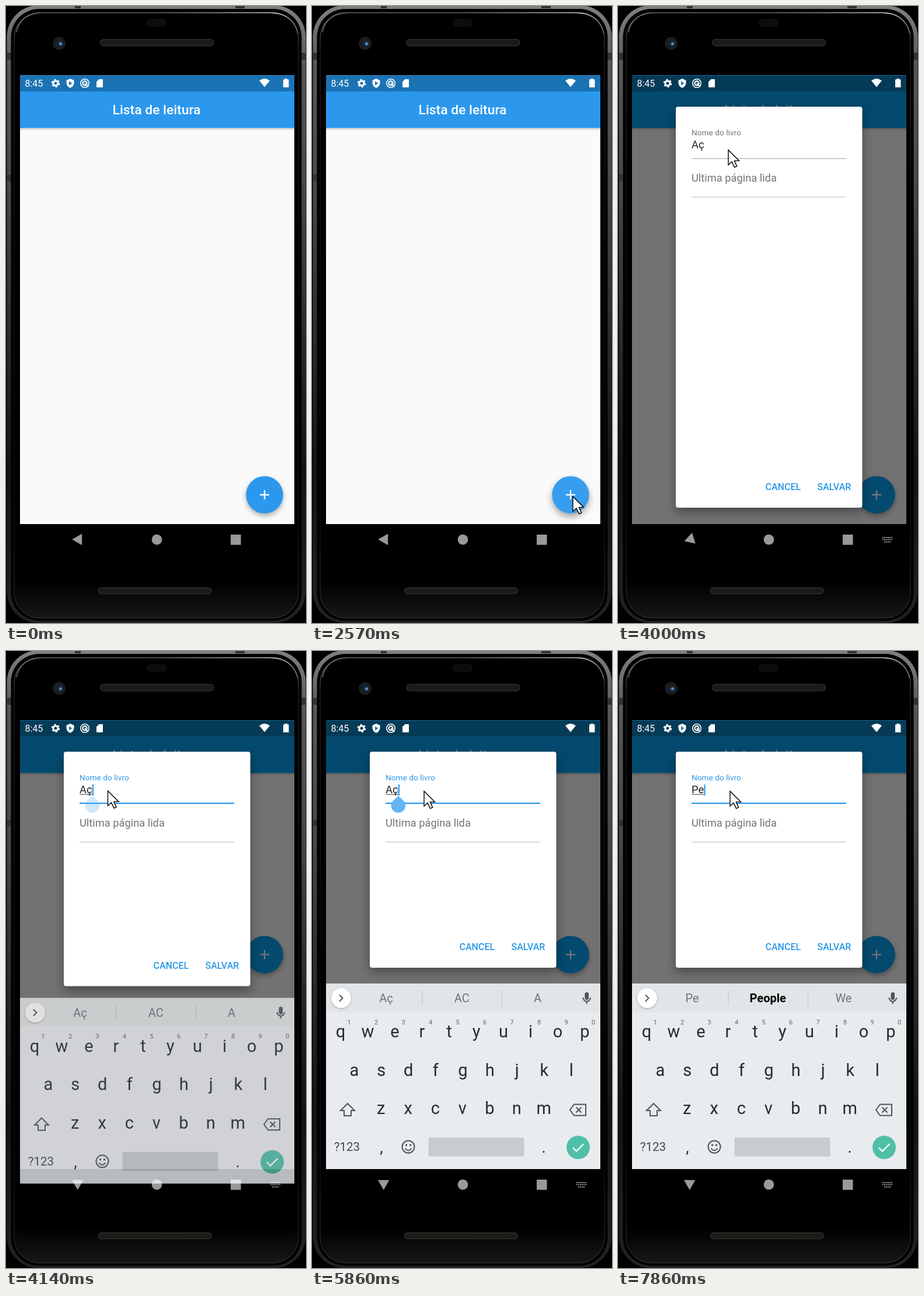
An HTML page for the animation above (8 s loop, 514x1054 px).

```html
<!DOCTYPE html>
<html lang="pt">
<head>
<meta charset="utf-8">
<title>Lista de leitura</title>
<style>
html, body { margin: 0; width: 100%; height: 100%; overflow: hidden; background: #000; }
svg { display: block; width: 100%; height: 100%; font-family: Roboto, sans-serif; }
.mid { text-anchor: middle; }
.med { font-weight: 500; }
.line { fill: none; stroke-linecap: butt; }
#dialog rect { filter: drop-shadow(0 7px 9px rgba(0,0,0,.38)); }
#chip { filter: drop-shadow(0 1px 1.5px rgba(0,0,0,.3)); }
</style>
</head>
<body>
<svg viewBox="0 0 514 1054" xmlns="http://www.w3.org/2000/svg">
  <defs>
    <linearGradient id="rim" x1="0" y1="0" x2="0" y2="1">
      <stop offset="0" stop-color="#808080"/><stop offset=".1" stop-color="#565656"/>
      <stop offset=".3" stop-color="#484848"/><stop offset=".55" stop-color="#2a2a2a"/>
      <stop offset=".75" stop-color="#141414"/><stop offset="1" stop-color="#222"/>
    </linearGradient>
    <linearGradient id="edge" x1="0" y1="0" x2="0" y2="1">
      <stop offset="0" stop-color="#777"/><stop offset=".06" stop-color="#262626"/>
      <stop offset=".5" stop-color="#101010"/><stop offset=".85" stop-color="#141414"/>
      <stop offset="1" stop-color="#303030"/>
    </linearGradient>
    <linearGradient id="chin" x1="0" y1="0" x2="0" y2="1">
      <stop offset="0" stop-color="#000"/><stop offset=".94" stop-color="#000"/>
      <stop offset="1" stop-color="#171717"/>
    </linearGradient>
    <linearGradient id="glint">
      <stop offset="0" stop-color="#666"/><stop offset=".5" stop-color="#666"/>
      <stop offset=".93" stop-color="#ccc"/><stop offset="1" stop-color="#666"/>
    </linearGradient>
    <linearGradient id="drop" x1="0" y1="0" x2="0" y2="1">
      <stop offset="0" stop-opacity=".2"/><stop offset="1" stop-opacity="0"/>
    </linearGradient>
    <clipPath id="screen"><rect x="24" y="118.5" width="470" height="766.5"/></clipPath>
  </defs>

  <!-- phone body -->
  <rect x="1.500" y="-1" width="512" height="1055" rx="54" fill="url(#rim)"/>
  <path d="M2 80h7v12H2zM2 288h7v11H2zM506 80h7v12h-7zM393 0h16v4h-16zM118 0h10v4h-10z" fill="#333"/>
  <rect x="8.500" y="5" width="498" height="1045" rx="48"/>
  <rect x="14" y="11.500" width="487" height="1034" rx="44" fill="url(#chin)" stroke="url(#edge)" stroke-width="1.200"/>
  <path class="line" d="M18 45Q24 12 64 11.500H452Q492 12 500 47" stroke="url(#glint)" stroke-width="1.600"/>
  <rect x="241" y="22" width="34" height="14" rx="6" fill="#0d0d10"/>
  <circle cx="91" cy="64" r="11" fill="#1c1c1d"/>
  <circle cx="92" cy="64" r="6" fill="#15263a"/>
  <circle cx="93.500" cy="64.500" r="2.600" fill="#5b88b0"/>
  <g fill="#1b1a18" stroke="#302e2a" stroke-width="1.500">
    <rect x="162" y="57" width="193.500" height="11" rx="5"/>
    <rect x="158.500" y="994" width="193.500" height="10" rx="5"/>
  </g>

  <g clip-path="url(#screen)">
    <rect x="24" y="118" width="470" height="768" fill="#fafafa"/>
    <rect x="24" y="208" width="470" height="5" fill="url(#drop)"/>
    <rect x="24" y="118" width="470" height="90.300" fill="#2b98ee"/>
    <rect x="24" y="118" width="470" height="28" fill="#1b73b4"/>
    <g class="tint">
      <rect x="24" y="118" width="470" height="90.300" fill="#09a1f3"/>
      <rect x="24" y="118" width="470" height="28" fill="#0d80bf"/>
    </g>
    <text class="mid med" x="258" y="185" font-size="22.860" fill="#fff">Lista de leitura</text>
    <g id="fab">
      <circle r="31.800" fill="#2b98ee"/>
      <circle class="tint" r="31.800" fill="#09a1f3"/>
      <circle id="ink" r="31.800" fill="#fff" opacity=".06"/>
      <path class="line" d="M-8 0H8M0-8V8" stroke="#fff" stroke-width="2.300"/>
    </g>
    <rect id="shade" x="24" y="118" width="470" height="768" opacity="0"/>

    <g id="dialog">
      <rect id="card" x="99" y="172" width="319.500" height="685" rx="4" fill="#fff"/>
      <text id="label" x="126" y="220.500" font-size="13.700">Nome do livro</text>
      <text id="value" x="126" y="243" font-size="18.290" fill="#212121"></text>
      <path id="compose" class="line" stroke="#333" stroke-width="1"/>
      <path id="under" class="line"/>
      <text x="126" y="300" font-size="18.290" fill="#757575">Ultima página lida</text>
      <path class="line" d="M126 326.500H391" stroke="#e0e0e0" stroke-width="2.600"/>
      <path id="caret" class="line" stroke="#2b98ee" stroke-width="2.200"/>
      <path id="handle" d="M148 247.500L156.600 255.400A12.300 12.300 0 1 1 139 255.400Z" fill="#64b5f6"/>
      <g id="actions" class="med" font-size="16" fill="#2b98e6">
        <text x="252.500">CANCEL</text><text x="341.500">SALVAR</text>
      </g>
    </g>

    <!-- status bar -->
    <g fill="#fff">
      <text x="32.500" y="138" font-size="16">8:45</text>
      <g class="line" stroke="#fff">
        <circle cx="85" cy="132" r="4" stroke-width="3"/>
        <circle cx="85" cy="132" r="6" stroke-width="2.500" stroke-dasharray="3.140"/>
        <circle cx="135" cy="132" r="7.200" stroke-width="1.600"/>
        <circle cx="135" cy="132" r="3.600" stroke-width="2.200"/>
        <path d="M135 132L141 138" stroke-width="2.200"/>
      </g>
      <path d="M110 124L116.500 127V131.500Q116 137.500 110 140Q104 137.500 103.500 131.500V127Z"/>
      <path d="M108 128.500L113.500 132L108 135.500Z" fill="#1b73b4"/>
      <path d="M159.500 125H165Q166 125 166 126V138Q166 139 165 139H156Q155 139 155 138V129.500Z"/>
      <path d="M434 127.500Q443 120.500 452 127.500L443 138.500Z"/>
      <path d="M477.500 125.500V124H482V125.500H484.500V139H475V125.500Z"/>
    </g>
  </g>

  <g id="board">
    <rect x="24" y="568" width="470" height="317" fill="#e9ecef"/>
    <rect x="24" y="568" width="470" height="49" fill="#e2e5e7"/>
    <circle id="chip" cx="50" cy="593" r="17" fill="#fff"/>
    <g class="line" stroke="#4a555b" stroke-width="2">
      <path d="M47 587.500L52.500 593L47 598.500"/>
      <path d="M189 579.500V606M325.500 579.500V606" stroke="#c4c9cc" stroke-width="1.200"/>
      <path d="M464.500 592A6 6.500 0 0 0 477 592M470.700 598V603"/>
      <path d="M61 773L73 785H67V794H55V785H49Z"/>
      <path d="M449 774.500H469V793.500H449L442 784ZM452.500 779.500L461.500 788.500M461.500 779.500L452.500 788.500"/>
      <circle cx="165" cy="847" r="10.500"/>
      <path d="M159.500 849.500Q165 857 170.500 849.500"/>
    </g>
    <rect x="467.500" y="583" width="6.500" height="13" rx="3.200" fill="#4a555b"/>
    <circle cx="161.500" cy="844" r="1.700" fill="#4a555b"/>
    <circle cx="168.500" cy="844" r="1.700" fill="#4a555b"/>
    <rect x="199.500" y="831" width="164" height="32.500" rx="3" fill="#c6ccd0"/>
    <circle cx="456" cy="848" r="20" fill="#4fc0a7"/>
    <path class="line" d="M447 848.500L453 854.500L465.500 842" stroke="#fff" stroke-width="2.300"/>
    <g id="hints" class="mid" font-size="20"></g>
    <g id="keys" class="mid" fill="#1f2c33"></g>
  </g>

  <!-- navigation -->
  <g fill="#fff" opacity=".6">
    <path id="back" d="M-9.500 0L7.500-9.700V9.700Z"/>
    <circle cx="258.500" cy="911.500" r="8.800"/>
    <rect x="385" y="903" width="17.500" height="17.500"/>
    <path id="ime" class="line" d="M453 908H470M453 911.500H470M456 915.500H467" stroke="#fff" stroke-width="2" stroke-dasharray="2 1"/>
  </g>

  <path id="mouse" d="M0 0V25.500L6 20L10.500 29.500L14.600 27.600L10.400 18.400H18.500Z" fill="#fff" stroke="#000" stroke-width="1.400"/>
</svg>

<script>
const LOOP = 8000, FPS = 7;
const $ = id => document.getElementById(id);
const clamp = v => Math.min(1, Math.max(0, v));
const ramp = (t, from, span) => clamp((t - from) / span);
const set = (id, attrs) => { for (const k in attrs) $(id).setAttribute(k, attrs[k]); };
const show = (id, on) => set(id, { visibility: on ? 'visible' : 'hidden' });
const text = (x, y, size, s, fill = '') =>
  `<text x="${x}" y="${y}" font-size="${size}"${fill && ` fill="${fill}"`}>${s}</text>`;

// keyboard letters: first key x, baseline, characters
const rows = [[49, 660, 'qwertyuiop'], [72.3, 725.7, 'asdfghjkl'], [118.3, 791.4, 'zxcvbnm']];
const PITCH = 46.5;
$('keys').innerHTML =
  rows.map(([x, y, s]) => [...s].map((c, i) => text(x + i * PITCH, y, 29, c)).join('')).join('') +
  [...'1234567890'].map((c, i) => text(63.5 + i * PITCH, 637.5, 11, c, '#5b666c')).join('') +
  text(60, 854, 20.5, '?123', '#3f4a50') + text(119, 857, 27, ',') + text(397, 857, 27, '.');

// pointer stops: time, x, y
const stops = [
  [857, 472, 868], [1900, 447, 838], [3000, 447, 838], [3857, 196, 250], [4000, 189, 246],
  [4142, 174.5, 239], [4857, 53, 237], [5280, 60, 238], [5710, 192, 239.5], [LOOP, 192, 239.5]
];
const caretOn = [[4100, 4570], [5000, 5500], [5700, 6140], [6400, 7100], [7560, LOOP]];
const typed = [[0, 'Aç'], [6420, 'A'], [6560, ''], [7560, 'P'], [7700, 'Pe']];
const hints = [[0, ['Aç', 'AC', 'A']], [6560, ['', '', '']], [7700, ['Pe', 'People', 'We']]];
const latest = (list, t) => list.filter(e => e[0] <= t).pop()[1];
const tints = document.querySelectorAll('.tint');

function pointer(t) {
  const i = stops.findIndex(s => s[0] > t);
  if (i < 1) return stops[0].slice(1);
  const [a, b] = [stops[i - 1], stops[i]];
  const u = (t - a[0]) / (b[0] - a[0]), e = u * u * (3 - 2 * u);
  return [a[1] + (b[1] - a[1]) * e, a[2] + (b[2] - a[2]) * e];
}

function drawHints(words) {
  $('hints').innerHTML = words.map((w, i) => {
    const bold = w === 'People';
    return `<text x="${127 + i * 129.7}" y="600" fill="${bold ? '#000' : '#6b757a'}"` +
      `${bold ? ' font-weight="700"' : ''}>${w}</text>`;
  }).join('');
}

function draw(ms) {
  const t = Math.floor((ms + 4) * FPS / 1000) * 1000 / FPS;
  const open = 1 - (1 - ramp(t, 2600, 250)) ** 2;
  const focus = t > 4100;
  const rise = focus ? ramp(t, 4000, 180) : 0;
  const pressed = t > 2500 && t < 2800;

  const fabY = focus ? 518.7 : 835;
  set('fab', { transform: `translate(443 ${fabY})` });
  $('fab').style.filter = pressed
    ? 'drop-shadow(0 6px 6px rgba(0,0,0,.35))' : 'drop-shadow(0 4px 4px rgba(0,0,0,.32))';
  show('ink', pressed);
  tints.forEach(el => el.setAttribute('opacity', open));
  set('shade', { opacity: .54 * open });
  set('dialog', { opacity: open });

  const bottom = 541 + 316 * (1 - rise) ** 1.46;
  set('card', { height: bottom - 172 });
  set('actions', { transform: `translate(0 ${bottom - 29.7})` });

  // the underline grows upward from a fixed lower edge
  const weight = focus ? 2.2 : 1;
  const accent = focus ? '#2b98ee' : '';
  set('label', { fill: accent || '#757575' });
  set('under', {
    d: `M126 ${261.2 - weight / 2}H391`, stroke: accent || '#9e9e9e', 'stroke-width': weight
  });
  const value = latest(typed, t);
  $('value').textContent = value;
  const end = 126 + (value ? $('value').getComputedTextLength() : 0);
  const lit = caretOn.some(([a, b]) => t >= a && t < b);
  show('caret', lit);
  show('compose', lit && value);
  set('caret', { d: `M${end + 1.4} 228V247` });
  set('compose', { d: `M126.5 245H${end}` });
  set('handle', { opacity: t < 6420 ? ramp(t, 4100, 140) : 0 });

  set('board', { opacity: rise, transform: `translate(0 ${120 * (1 - rise)})` });
  drawHints(latest(hints, t));

  set('back', { transform: `translate(122.7 911.3) rotate(${-90 * ramp(t, 3972, 140)})` });
  show('ime', t > 3950);

  show('mouse', t > 850);
  set('mouse', { transform: `translate(${pointer(t)})` });
}

const start = performance.now();
function tick() {
  draw((performance.now() - start) % LOOP);
  requestAnimationFrame(tick);
}
draw(0);
requestAnimationFrame(tick);
</script>
</body>
</html>
```
